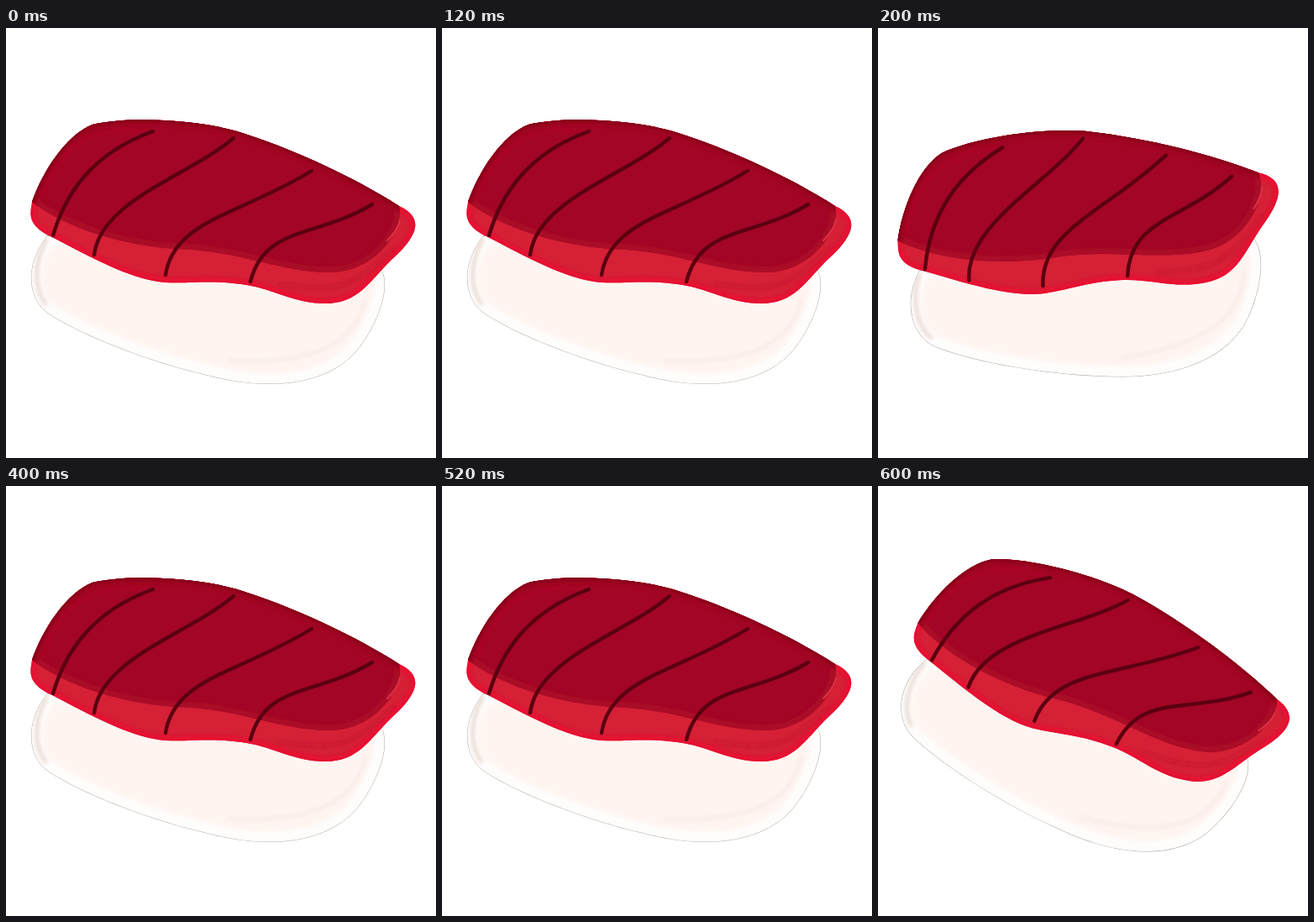
These frames come from a looping animation (512x512 px, 800 ms). An HTML page:

```html
<!DOCTYPE html>
<html lang="en">
<head>
<meta charset="utf-8">
<title>Rocking sushi</title>
<style>
  html, body { margin: 0; width: 100%; height: 100%; overflow: hidden; background: #fff; }
  svg { display: block; width: 100vw; height: 100vh; }
  g { fill: none; stroke-linecap: round; stroke-linejoin: round; }
  .soft { filter: url(#soft); }
</style>
</head>
<body>
<svg viewBox="0 0 512 512">
  <defs>
    <filter id="soft" x="-20%" y="-20%" width="140%" height="140%"><feGaussianBlur stdDeviation="2"/></filter>
    <path id="rice" d="M49 248C20 285 28 325 51 340C100 372 190 402 235 412C315 434 380 424 415 387C440 358 460 310 446 286L300 220Z"/>
    <path id="back" d="M31 207C44 170 72 127 103 115C150 104 230 110 275 123C340 143 415 178 468 212"/>
    <path id="fish" d="M31 207C44 170 72 127 103 115C150 104 230 110 275 123C340 143 415 178 468 212C499 226 490 248 460 275C432 302 420 328 380 328C342 328 315 309 280 305C245 300 225 304 190 303C150 300 105 275 55 249C22 234 30 218 31 207Z"/>
    <path id="top" d="M31 207C44 170 72 127 103 115C150 104 230 110 275 123C340 143 415 178 468 212C475 240 440 291 385 291C325 291 275 264 200 263C130 258 65 234 31 207Z"/>
    <clipPath id="inRice"><use href="#rice"/></clipPath>
    <clipPath id="inFish"><use href="#fish"/></clipPath>
    <clipPath id="inTop"><use href="#top"/></clipPath>
  </defs>
  <g id="sushi">
    <use href="#rice" fill="#fef5f1" stroke="#a8a5a3"/>
    <g clip-path="url(#inRice)" class="soft">
      <use href="#rice" stroke="#fffdfb" stroke-width="24"/>
      <path d="M48 252C30 285 36 315 47 328" stroke="#eadcd6" stroke-width="5"/>
      <path d="M428 322C415 385 350 400 265 396" stroke="#f8ebe6" stroke-width="4"/>
    </g>

    <use href="#fish" fill="#d52035"/>
    <g clip-path="url(#inFish)">
      <use href="#fish" stroke="#e90f30" stroke-width="10" class="soft"/>
      <path d="M462 262C415 308 400 315 325 305" stroke="#c2142e" stroke-width="2" class="soft"/>
    </g>

    <use href="#top" fill="#a20525"/>
    <g clip-path="url(#inTop)">
      <use href="#top" stroke="#aa0928" stroke-width="14" class="soft"/>
      <use href="#back" stroke="#96001f" stroke-width="12" class="soft"/>
      <use href="#back" stroke="#860019" stroke-width="4"/>
      <path d="M42 203C60 155 90 115 166 122" stroke="#b50f2c" stroke-width="2" class="soft"/>
    </g>
    <path d="M469 229Q466 241 454 253" stroke="#dc3148" stroke-width="2"/>

    <g stroke="#5a0010" stroke-width="4.4">
      <path d="M175 123C100 150 70 200 56 247"/>
      <path d="M271 131C220 175 113 205 105 270"/>
      <path d="M364 170C280 222 200 228 190 294"/>
      <path d="M436 210C370 250 308 235 291 302"/>
    </g>
  </g>
</svg>
<script>
const sushi = document.getElementById("sushi");
const start = performance.now();

// Four held poses per loop: level, left, level, right
function draw(now) {
  const step = Math.floor(Math.max(0, now - start) / 200);
  const angle = -11.3 * Math.sin(step % 4 * Math.PI / 2);
  sushi.setAttribute("transform", `rotate(${angle.toFixed(2)} 260 268)`);
  requestAnimationFrame(draw);
}
draw(start);
</script>
</body>
</html>
```
